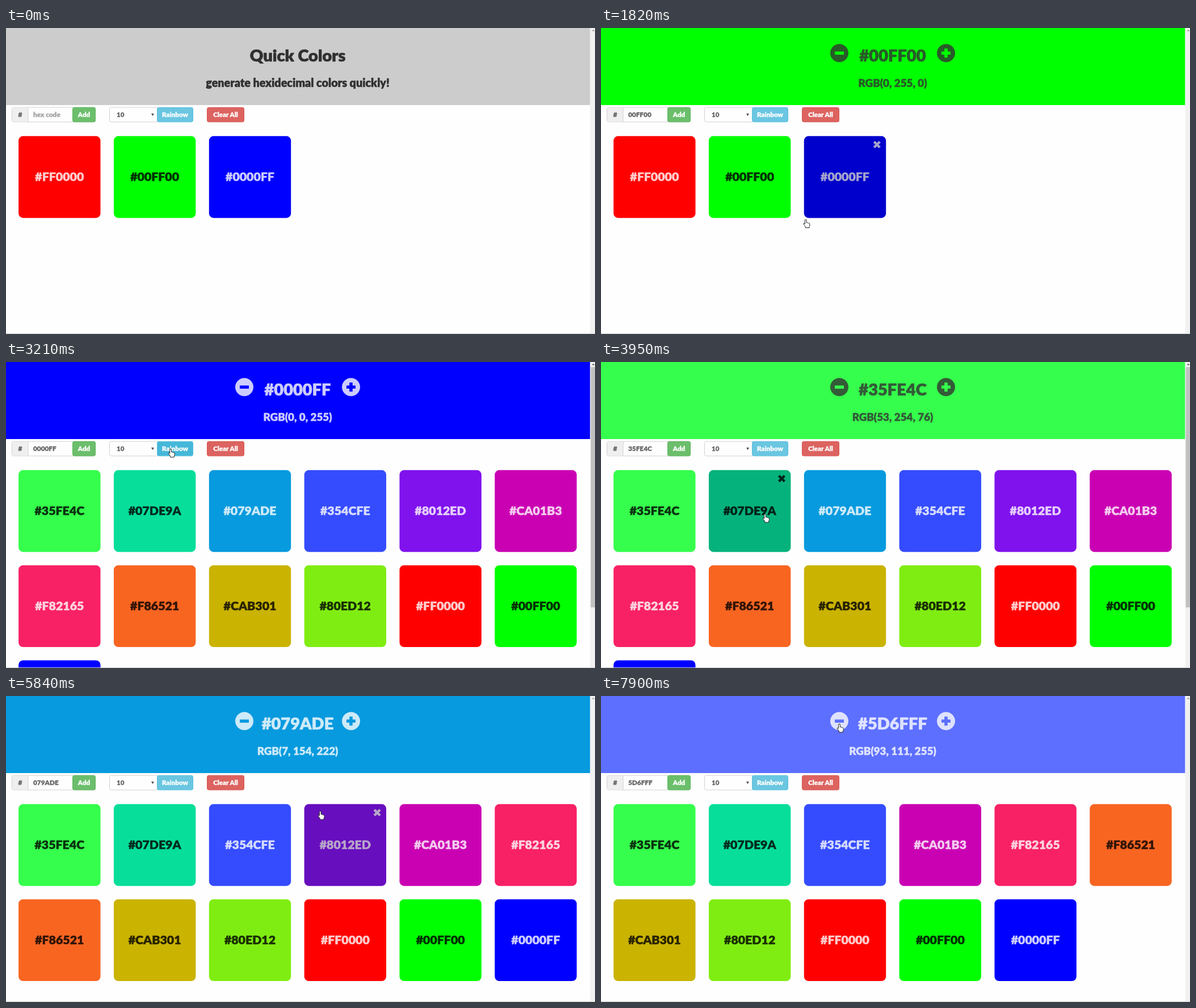
Recreate the animation shown at these times as an HTML page. Size 1038 by 540 pixels, loop 8000 ms.

```html
<!DOCTYPE html>
<html lang="en">
<head>
<meta charset="utf-8">
<title>Quick Colors</title>
<style>
  html, body { margin: 0; width: 100%; height: 100%; overflow: hidden; background: #fefefe; }
  svg { display: block; font: 900 12px Lato, "Open Sans", sans-serif; }
  text { stroke-width: .025em; stroke-linejoin: round; }
</style>
</head>
<body>
<svg id="stage" width="1038" height="540" viewBox="0 0 1038 540"></svg>
<script>
const LOOP = 8000;
const SIZE = 144.4, PITCH = 167.85, LEFT = 22.1, TOP = 190.8;
const stage = document.getElementById('stage');

const toHex = channels =>
  channels.map(v => Math.floor(v).toString(16).padStart(2, '0')).join('').toUpperCase();
const toRgb = hex => hex.match(/../g).map(c => parseInt(c, 16));
const isDark = hex => {
  const [r, g, b] = toRgb(hex);
  return r * .299 + g * .587 + b * .114 < 128;
};

// Three sine waves, 120 degrees apart
const wave = degrees => 128 + 127 * Math.sin(degrees * Math.PI / 180);
const rainbow = Array.from({ length: 10 }, (_, i) =>
  toHex([0, 240, 120].map(phase => wave(36 * (i - 4) + phase))));
const [red, green, blue] = ['FF0000', '00FF00', '0000FF'];

const picks = [
  [630, red], [1290, green], [2150, blue],
  [3720, rainbow[0]], [4220, rainbow[1]], [4670, rainbow[2]], [6900, rainbow[3]]
];
const removals = [[5540, rainbow[2]], [6260, rainbow[4]]];
const RAINBOW_CLICK = 3180, PLUS_CLICK = 7400, MINUS_CLICK = 7860;

// Pointer moves: [start, end, destination, downward arc]
const onCard = (i, dx = 0, dy = 0) => [LEFT + SIZE / 2 + PITCH * i + dx, 268 + dy];
const onCross = i => onCard(i, 56, -65);
const moves = [
  [70, 440, onCard(0)],
  [780, 1300, onCard(1), 75],
  [1600, 2190, onCard(2, -6, 12), 66],
  [2540, 3000, [290, 153]],
  [3440, 3660, onCard(0)],
  [3740, 3950, onCard(1, 27)],
  [4220, 4440, onCard(2, -24, 12)],
  [5050, 5500, onCross(2)],
  [5800, 5980, onCross(3)],
  [6260, 6670, onCard(2, -8, -4)],
  [6900, 7340, [606, 43]],
  [7700, 7860, [420, 49]]
];

function pointerAt(t) {
  if (t < moves[0][0]) return null;
  let [x, y] = [859, 503];
  for (const [start, end, to, arc = 0] of moves) {
    if (t < start) break;
    const u = Math.min(1, (t - start) / (end - start));
    const k = 1 - (1 - u) ** 2;
    x += (to[0] - x) * k;
    y += (to[1] - y) * k + arc * Math.sin(Math.PI * k);
  }
  return { x, y };
}

function pickedAt(t) {
  const last = picks.filter(p => p[0] <= t).pop();
  if (!last || t < PLUS_CLICK) return last ? last[1] : '';
  const steps = t < MINUS_CLICK ? Math.min(5, 1 + Math.floor((t - PLUS_CLICK) / 60)) : 4;
  const lighter = [10, 8.75, .25];
  return toHex(toRgb(last[1]).map((v, i) => Math.min(255, v + lighter[i] * steps)));
}

function colorsAt(t) {
  const all = [...(t < RAINBOW_CLICK ? [] : rainbow), red, green, blue];
  return all.filter(c => !removals.some(([time, hex]) => hex === c && t >= time));
}

const rect = (x, y, w, h, fill, extra = '') =>
  `<rect x="${x}" y="${y}" width="${w}" height="${h}" fill="${fill}" ${extra}/>`;
const text = (x, y, str, size, fill, extra = 'text-anchor="middle"') =>
  `<text x="${x}" y="${y}" font-size="${size}" fill="${fill}" stroke="${fill}" ${extra}>${str}</text>`;
const shape = (d, attrs) => `<path d="${d}" ${attrs}/>`;
const inside = (p, x, y, w, h) => p && p.x >= x && p.x <= x + w && p.y >= y && p.y <= y + h;

function header(hex) {
  if (!hex) {
    return rect(0, 0, 1029.5, 136, '#ccc') +
      text(514, 59, 'Quick Colors', 29, '#303030') +
      text(514, 104, 'generate hexidecimal colors quickly!', 19.8, '#303030');
  }
  const bg = '#' + hex, ink = isDark(hex) ? '#fff' : '#333';
  const icon = (x, bar = '') => `<circle cx="${x}" cy="44.3" r="16" fill="${ink}"/>` +
    shape(`M${x - 8} 44.3h16${bar}`, `stroke="${bg}" stroke-width="5.6"`);
  return rect(0, 0, 1029.5, 136, bg) + '<g opacity=".8">' +
    icon(420) + icon(608, 'm-8-8v16') +
    text(514, 59, bg, 29, ink) +
    text(514, 104, `RGB(${toRgb(hex).join(', ')})`, 18.8, ink) + '</g>';
}

function controls(hex, hover) {
  const box = (x, w, fill, line) =>
    rect(x + .5, 140.2, w - 1, 25.6, fill, `rx="3" stroke="${line}"`);
  const button = (x, w, label, fill, line) =>
    box(x, w, fill, line) + text(x + w / 2, 157, label, 11.6, '#fff');
  return '<g opacity=".9">' +
    box(10, 148, '#fff', '#ccc') +
    rect(11, 140.7, 28, 24.6, '#eee') + rect(38.5, 140.2, 1, 25.6, '#ccc') +
    text(25, 157, '#', 12, '#555') +
    text(48, 157, hex || 'hex code', 11.8, hex ? '#555' : '#999', '') +
    button(117, 41, 'Add', '#5cb85c', '#4cae4c') +
    box(182, 88, '#fff', '#ccc') + text(195, 157, '10', 11.5, '#555', '') +
    shape('M256 151h5l-2.5 4.5z', 'fill="#444"') +
    button(266, 64, 'Rainbow', hover ? '#31b0d5' : '#5bc0de', '#46b8da') +
    button(354, 66, 'Clear All', '#d9534f', '#d43f3a') + '</g>';
}

function card(hex, i, pointer, selected) {
  const x = LEFT + i % 6 * PITCH, y = TOP + Math.floor(i / 6) * PITCH;
  const ink = isDark(hex) ? '#fff' : '#000';
  const hover = inside(pointer, x, y, SIZE, SIZE + 3);
  let out = rect(x, y, SIZE, SIZE, '#' + hex, 'rx="8"');
  if (selected) out += rect(x + 27, y + 59, 15, 24, '#0a70d8');
  out += text(x + SIZE / 2, y + 79.5, '#' + hex, 21.3, ink, 'text-anchor="middle" opacity=".8"');
  if (hover) {
    out += shape(`M${x + 123.5} ${y + 10}l10 10m0-10l-10 10`, `stroke="${ink}" stroke-width="4.4" opacity=".8"`) +
      rect(x, y, SIZE, SIZE, '#000', 'rx="8" opacity=".2"');
  }
  return { out, hover };
}

function scrollbar(active) {
  return rect(1029.5, 0, 8.5, 540, '#f1f1f1') +
    shape('M1032.500 5.500h5l-2.500-3z', `fill="${active ? '#606060' : '#a3a3a3'}"`) +
    (active ? rect(1030.5, 9, 7.5, 424, '#c1c1c1') : '') +
    rect(0, 539, 1038, 1, '#c9c9c9');
}

function cursor({ x, y }, hand) {
  const d = hand
    ? 'M-1.4 1Q0-.6 1.4 1V6Q2.700 5 3.700 6.500Q5 5.600 5.700 7.200Q7.200 6.500 7.200 8.400V10.700Q7 12 6.300 13V15H-.4V13.200Q-2 11-3.700 8.700Q-4 7-2.600 7.200L-1.400 8.500Z'
    : 'M0 0V16L3.700 12.500L6.200 18.300L8.600 17.300L6.100 11.600H11.300Z';
  return shape(d, `transform="translate(${x} ${y})" fill="#fff" stroke="#222" stroke-linejoin="round"`);
}

function scene(t) {
  const p = pointerAt(t), hex = pickedAt(t), colors = colorsAt(t);
  const cards = colors.map((c, i) => card(c, i, p, c === rainbow[2] && t >= 4710));
  const onRainbow = inside(p, 266, 140, 64, 26);
  const onIcon = hex && [404, 592].some(x => inside(p, x, 28, 32, 32));
  const hand = onRainbow || onIcon || cards.some(c => c.hover);
  return rect(0, 0, 1038, 540, '#fefefe') + header(hex) + controls(hex, onRainbow) +
    cards.map(c => c.out).join('') + scrollbar(colors.length > 12) + (p ? cursor(p, hand) : '');
}

const start = performance.now();
function frame() {
  stage.innerHTML = scene((performance.now() - start) % LOOP);
  requestAnimationFrame(frame);
}
frame();
</script>
</body>
</html>
```
